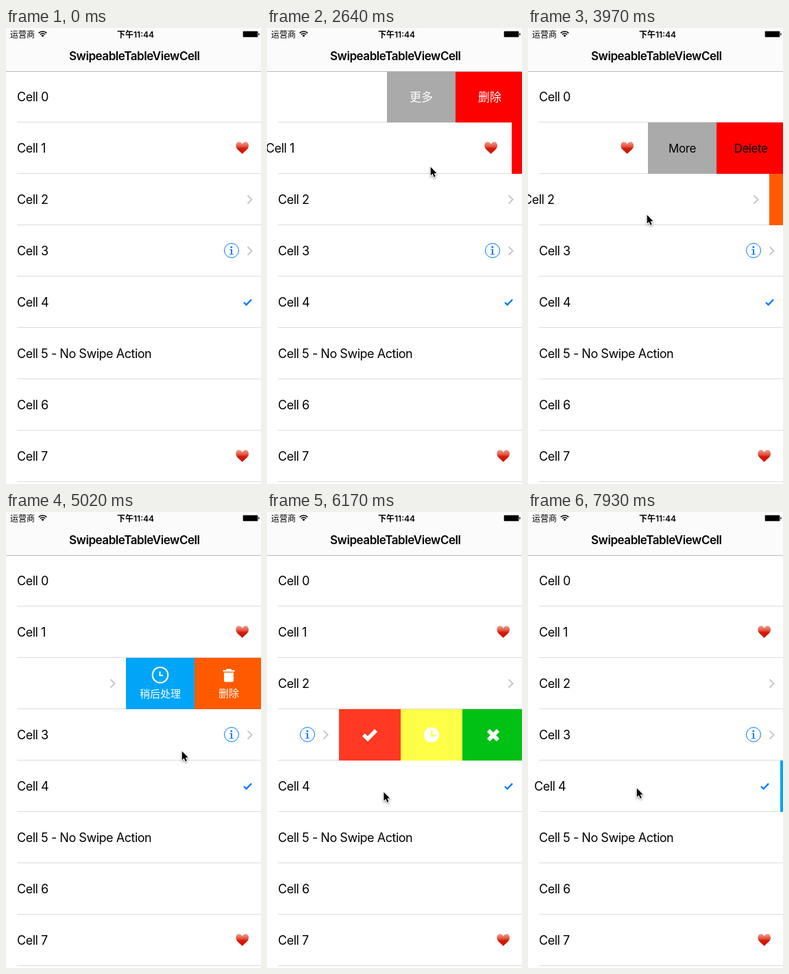
An HTML page with a canvas that plays this animation: 372x666 px, repeating every 8000 ms.

```html
<!DOCTYPE html>
<html lang="zh-Hans">
<head>
<meta charset="utf-8">
<title>SwipeableTableViewCell</title>
<style>
html, body { margin: 0; width: 100%; height: 100%; overflow: hidden; background: #fff; }
canvas { display: block; }
</style>
</head>
<body>
<canvas id="stage" width="372" height="666"></canvas>
<script>
const ctx = document.getElementById('stage').getContext('2d');
const W = 372, H = 666, SCREEN = 375, TOP = 63, ROW = 75;
const LOOP = 8000, TICK = 88;
const DRAG = 480, CLOSE_DELAY = 320, CLOSE = 300, LAST_CLOSE = 7700;
const BLUE = '#007aff', GRAY = '#c7c7cc', SKY = '#00a5f7';
const FONT = 'Inter, "Noto Sans CJK SC", "Noto Sans CJK", sans-serif';

// Each swipe opens the row of the same index; the pointer is dragged between the two points
const swipes = [
  { start: 1408, from: [251, 100], to: [60, 88] },
  { start: 2552, from: [255, 206], to: [62, 165] },
  { start: 3858, from: [193, 278], to: [20, 230] },
  { start: 5020, from: [256, 349], to: [29, 316] },
  { start: 6600, from: [246, 411], to: [158, 403] }
];
const ENTRY = { time: 792, from: [327, 116], to: [239, 89], moveOn: 1100 };

const rows = [
  { buttons: [button(100, '#aaaaaa', caption('更多')), button(100, '#ff0000', caption('删除'))] },
  { accessory: heart,
    buttons: [button(100, '#aaaaaa', caption('More', '#000')), button(100, '#ff0000', caption('Delete', '#000'))] },
  { accessory: chevron, buttons: [button(100, SKY, snooze), button(100, '#ff5a00', trash)] },
  { accessory: y => { info(y); chevron(y); },
    buttons: [button(90, '#ff3923', boldCheck), button(90, '#ffff48', solidClock), button(90, '#00c114', boldCross)] },
  { accessory: checkmark, buttons: [button(100, SKY, () => {})] },
  { label: 'Cell 5 - No Swipe Action' },
  {},
  { accessory: heart }
];

// Motion

const clamp = p => Math.min(1, Math.max(0, p));
const smooth = p => p * p * (3 - 2 * p);
const easeOut = (p, power) => 1 - (1 - p) ** power;
const mix = (a, b, p) => a + (b - a) * p;

function drag(a, b, p) {
  const e = smooth(clamp(p));
  return [mix(a[0], b[0], e), mix(a[1], b[1], e)];
}

// Free pointer travel: the height settles before the sideways move does
function glide(a, b, p) {
  p = clamp(p);
  return [mix(a[0], b[0], smooth(p)), mix(a[1], b[1], easeOut(p, 4))];
}

function cursorAt(t) {
  const i = swipes.findLastIndex(s => t >= s.start);
  if (i < 0) {
    return t < ENTRY.moveOn
      ? glide(ENTRY.from, ENTRY.to, (t - ENTRY.time) / (2 * TICK))
      : glide(ENTRY.to, swipes[0].from, (t - ENTRY.moveOn) / (1.5 * TICK));
  }
  const s = swipes[i], next = swipes[i + 1], end = s.start + DRAG;
  if (t < end || !next) return drag(s.from, s.to, (t - s.start) / DRAG);
  return glide(s.to, next.from, (t - end) / (next.start - end));
}

function offsetAt(i, t) {
  const s = swipes[i], next = swipes[i + 1];
  if (!s) return 0;
  const width = rows[i].buttons.reduce((sum, b) => sum + b.width, 0);
  const closeAt = next ? next.start + CLOSE_DELAY : LAST_CLOSE;
  const open = smooth(clamp((t - s.start) / DRAG));
  const closed = easeOut(clamp((t - closeAt) / CLOSE), 2);
  return Math.round(width * open * (1 - closed));
}

// Drawing helpers

function button(width, color, draw) {
  return { width, color, draw };
}

function caption(str, color = '#fff') {
  return (x, y) => text(str, x, y + 6.5, 17, color, 'center');
}

function text(str, x, y, size, color = '#000', align = 'left', weight = 400) {
  const latin = /^[\x00-\x7f]+$/.test(str);
  ctx.font = `${weight} ${size}px ${FONT}`;
  ctx.letterSpacing = latin ? `${-0.026 * size}px` : '0px';
  ctx.textAlign = align;
  ctx.fillStyle = color;
  ctx.fillText(str, x, y);
}

function rect(x, y, w, h, color) {
  ctx.fillStyle = color;
  ctx.fillRect(x, y, w, h);
}

function disc(x, y, r, color) {
  ctx.beginPath();
  ctx.arc(x, y, r, 0, Math.PI * 2);
  ctx.fillStyle = color;
  ctx.fill();
}

function stroke(color, width) {
  ctx.strokeStyle = color;
  ctx.lineWidth = width;
  ctx.stroke();
}

function line(points, color, width) {
  ctx.beginPath();
  points.forEach(p => ctx.lineTo(...p));
  stroke(color, width);
}

function ring(x, y, r, color, width) {
  ctx.beginPath();
  ctx.arc(x, y, r, 0, Math.PI * 2);
  stroke(color, width);
}

// Accessories

function heart(y) {
  const x = 344.7;
  ctx.beginPath();
  for (const side of [-1, 1]) {
    ctx.moveTo(x, y - 5);
    ctx.bezierCurveTo(x + side * 2, y - 10.5, x + side * 9.3, y - 10, x + side * 9.3, y - 3);
    ctx.bezierCurveTo(x + side * 9.3, y + 2, x + side * 3, y + 5, x, y + 9);
  }
  const shade = ctx.createLinearGradient(0, y - 9, 0, y + 9);
  shade.addColorStop(0, '#f0a294');
  shade.addColorStop(0.4, '#e2503d');
  shade.addColorStop(0.55, '#d81a04');
  shade.addColorStop(1, '#c51200');
  ctx.fillStyle = shade;
  ctx.fill();
  ctx.beginPath();
  ctx.moveTo(x, y - 5);
}

function chevron(y) {
  line([[352.5, y - 5.5], [358.5, y + 0.5], [352.5, y + 6.5]], GRAY, 2);
}

function info(y) {
  ring(329, y, 10.5, BLUE, 1);
  disc(328.8, y - 5, 1.5, BLUE);
  rect(328, y - 2, 2, 7.5, BLUE);
  rect(326, y - 2, 3, 0.8, BLUE);
  rect(326, y + 5, 6, 0.8, BLUE);
}

function checkmark(y) {
  line([[347, y + 0.8], [350.6, y + 4.4], [358, y - 3.4]], BLUE, 2.3);
}

// Button faces

function snooze(x, y) {
  ring(x, y - 12, 11.3, '#fff', 2);
  line([[x - 0.5, y - 17], [x - 0.5, y - 11.2], [x + 4, y - 11.2]], '#fff', 2);
  text('稍后处理', x, y + 21, 15, '#fff', 'center');
}

function trash(x, y) {
  rect(x - 8.5, y - 19, 17, 2.2, '#fff');
  rect(x - 3.5, y - 21, 7, 2.5, '#fff');
  ctx.beginPath();
  ctx.roundRect(x - 7, y - 15.5, 14, 13.8, [0, 0, 2, 2]);
  ctx.fill();
  text('删除', x, y + 19.5, 15, '#fff', 'center');
}

function boldCheck(x, y) {
  line([[x - 9.2, y + 0.5], [x - 3, y + 6.3], [x + 9, y - 6]], '#fff', 5.6);
}

function solidClock(x, y) {
  disc(x, y + 0.5, 11, '#fff');
  line([[x + 0.3, y - 6], [x + 0.3, y + 1.5], [x + 6, y + 1.5]], '#ffff48', 2.6);
}

function boldCross(x, y) {
  for (const side of [-7, 7]) line([[x - side, y - 6], [x + side, y + 8]], '#fff', 5.8);
}

// Scene

function drawRow(row, i, offset) {
  const y = TOP + ROW * i, mid = y + 37;
  if (offset > 0) {
    let x = SCREEN;
    for (const b of [...row.buttons].reverse()) {
      x -= b.width;
      rect(x, y, b.width, ROW, b.color);
      b.draw(x + b.width / 2, mid);
    }
  }
  ctx.save();
  ctx.translate(-offset, 0);
  rect(0, y, SCREEN, ROW, '#fff');
  text(row.label || `Cell ${i}`, 16, mid + 6.5, 18);
  if (row.accessory) row.accessory(mid);
  ctx.restore();
  rect(16, y + ROW - 1, SCREEN - offset - 16, 1, '#dcdcde');
}

function drawHeader() {
  rect(0, 0, W, TOP, '#fbfbfb');
  rect(0, TOP, W, 1, '#bcbcbc');
  text('运营商', 6, 13.5, 12);
  for (const r of [8.2, 5.2, 1.7]) {
    ctx.beginPath();
    ctx.arc(53.5, 13.2, r, -Math.PI * 0.75, -Math.PI * 0.25);
    stroke('#000', r > 2 ? 1.7 : 2.8);
  }
  text('下午11:44', 189, 13.5, 12, '#000', 'center', 600);
  ctx.beginPath();
  ctx.roundRect(345.5, 4.5, 22, 9, 1.5);
  stroke('#999', 0.8);
  rect(346, 5, 21, 8, '#000');
  rect(368.2, 7.5, 1.3, 3, '#000');
  text('SwipeableTableViewCell', 187.3, 47, 17, '#000', 'center', 600);
}

function drawCursor(x, y) {
  ctx.save();
  ctx.translate(x + 0.8, y + 0.6);
  ctx.scale(0.9, 0.9);
  ctx.beginPath();
  [[0, 0], [0, 14], [3.2, 11], [5.6, 16.4], [7.8, 15.4], [5.5, 10.2], [9.8, 10]]
    .forEach(p => ctx.lineTo(...p));
  ctx.closePath();
  ctx.shadowColor = 'rgba(0,0,0,0.4)';
  ctx.shadowBlur = 3;
  ctx.shadowOffsetY = 1.5;
  stroke('#fff', 2);
  ctx.shadowColor = 'transparent';
  ctx.fillStyle = '#000';
  ctx.fill();
  ctx.restore();
}

function draw(t) {
  rect(0, 0, W, H, '#fff');
  rows.forEach((row, i) => drawRow(row, i, offsetAt(i, t)));
  drawHeader();
  if (t >= ENTRY.time) drawCursor(...cursorAt(t));
}

const start = performance.now();
function frame() {
  const t = (performance.now() - start) % LOOP;
  draw(Math.floor(t / TICK) * TICK);
  requestAnimationFrame(frame);
}
frame();
</script>
</body>
</html>
```
